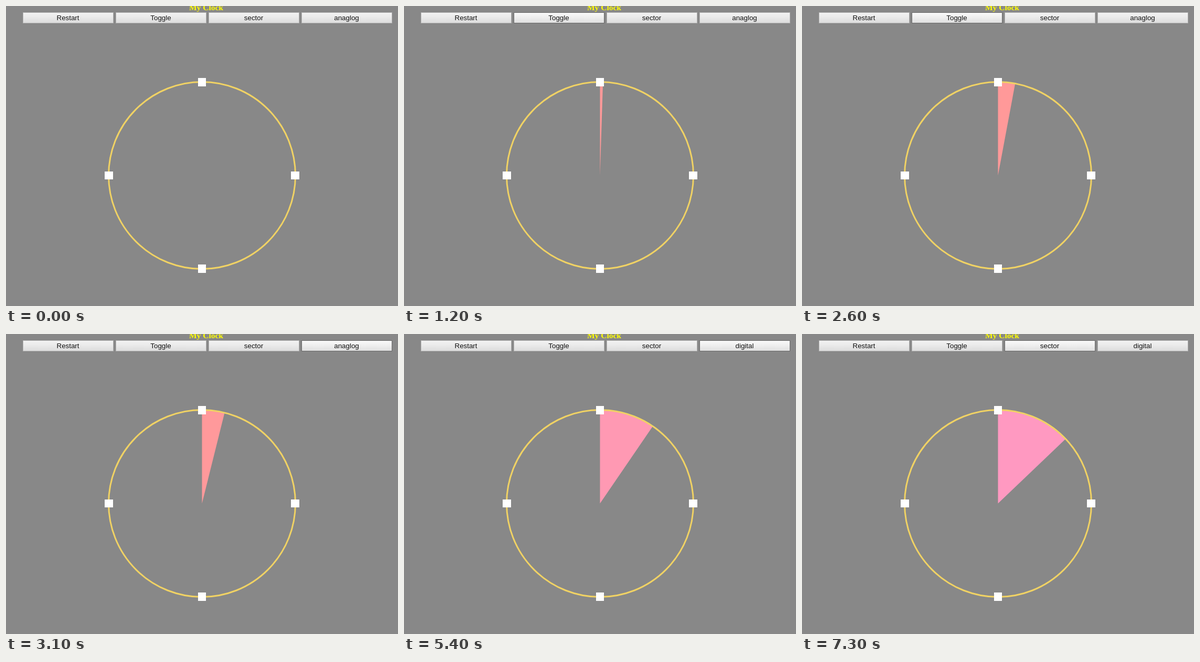
Write an HTML page that moves like this. It is 747 px wide and 571 px high and loops after 8000 ms.

```html
<!DOCTYPE html>
<html lang="en">
<head>
<meta charset="utf-8">
<title>My Clock</title>
<style>
  html, body { margin: 0; width: 747px; height: 571px; overflow: hidden; background: #888; }
  svg { display: block; }
  .title { font: bold 15.5px "Liberation Serif", "Times New Roman", serif; fill: #ff0; }
  .label { font: 13.333px "Liberation Sans", Arial, sans-serif; fill: #111; }
  text { text-anchor: middle; }
</style>
</head>
<body>
<svg id="stage" width="747" height="571" viewBox="0 0 747 571">
  <defs>
    <linearGradient id="face" x1="0" y1="0" x2="0" y2="1">
      <stop offset="0" stop-color="#f3f3f3"/>
      <stop offset=".4" stop-color="#ebebeb"/>
      <stop offset="1" stop-color="#dcdcdc"/>
    </linearGradient>
    <linearGradient id="faceHot" x1="0" y1="0" x2="0" y2="1">
      <stop offset="0" stop-color="#fafafa"/>
      <stop offset=".4" stop-color="#f0f0f0"/>
      <stop offset="1" stop-color="#dfdfdf"/>
    </linearGradient>
  </defs>
  <rect width="747" height="571" fill="#888"/>
  <text class="title" x="381.5" y="8">My Clock</text>
  <g id="buttons"></g>
  <path id="sector"/>
  <circle cx="373.5" cy="322.5" r="178" fill="none" stroke="#f0d264" stroke-width="3"/>
  <path fill="#fff" d="M366 137h15v16h-15zM366 492h15v16h-15zM188 315h16v15h-16zM543 315h16v15h-16z"/>
</svg>
<script>
const LOOP = 8000, CX = 373.5, CY = 322.5, RADIUS = 177.5;
const NONE = -1, TOGGLE = 1, SECTOR = 2, MODE = 3;

// [start time, hovered button]
const hovers = [
  [0, NONE], [200, MODE], [300, SECTOR], [500, NONE], [600, TOGGLE],
  [2800, NONE], [2900, SECTOR], [3000, MODE], [5800, NONE], [5900, SECTOR]
];
const ticks = [3600, 4500, 5400, 6300, 7300];

function add(parent, tag, attrs) {
  const node = document.createElementNS("http://www.w3.org/2000/svg", tag);
  for (const key in attrs) node.setAttribute(key, attrs[key]);
  return parent.appendChild(node);
}

const group = document.getElementById("buttons");
const sector = document.getElementById("sector");
const buttons = ["Restart", "Toggle", "sector", "anaglog"].map((name, i) => {
  const x = 32 + 177 * i;
  const box = add(group, "rect", { x: x + .5, y: 12.5, width: 172, height: 20 });
  const label = add(group, "text", { class: "label", x: x + 86, y: 27 });
  label.textContent = name;
  return { box, label };
});

// Fine steps while sweeping, then whole-second ticks.
function angleAt(t) {
  if (t < 1000) return 0;
  if (t >= 3600) return 16.4 + 6 * ticks.filter(start => t >= start).length;
  const step = Math.floor((t - 1000) / 100);
  return 0.6 * (step % 9 + 1) + 5.8 * Math.floor(step / 9);
}

function draw(t) {
  const hot = hovers.filter(([start]) => t >= start).pop()[1];
  buttons.forEach(({ box }, i) => {
    box.setAttribute("fill", i === hot ? "url(#faceHot)" : "url(#face)");
    box.setAttribute("stroke", i === hot ? "#686868" : "#b2b2b2");
  });
  buttons[MODE].label.textContent = t < 3600 ? "anaglog" : "digital";

  const angle = angleAt(t), rad = angle * Math.PI / 180;
  const x = CX + RADIUS * Math.sin(rad), y = CY - RADIUS * Math.cos(rad);
  const blue = Math.round(153 + Math.max(0, angle - 12) * 1.15);
  sector.setAttribute("d", angle
    ? `M${CX} ${CY}V${CY - RADIUS}A${RADIUS} ${RADIUS} 0 0 1 ${x} ${y}Z` : "");
  sector.setAttribute("fill", `rgb(255,153,${blue})`);
}

const began = performance.now();
function frame() {
  draw((performance.now() - began) % LOOP);
  requestAnimationFrame(frame);
}
frame();
</script>
</body>
</html>
```
